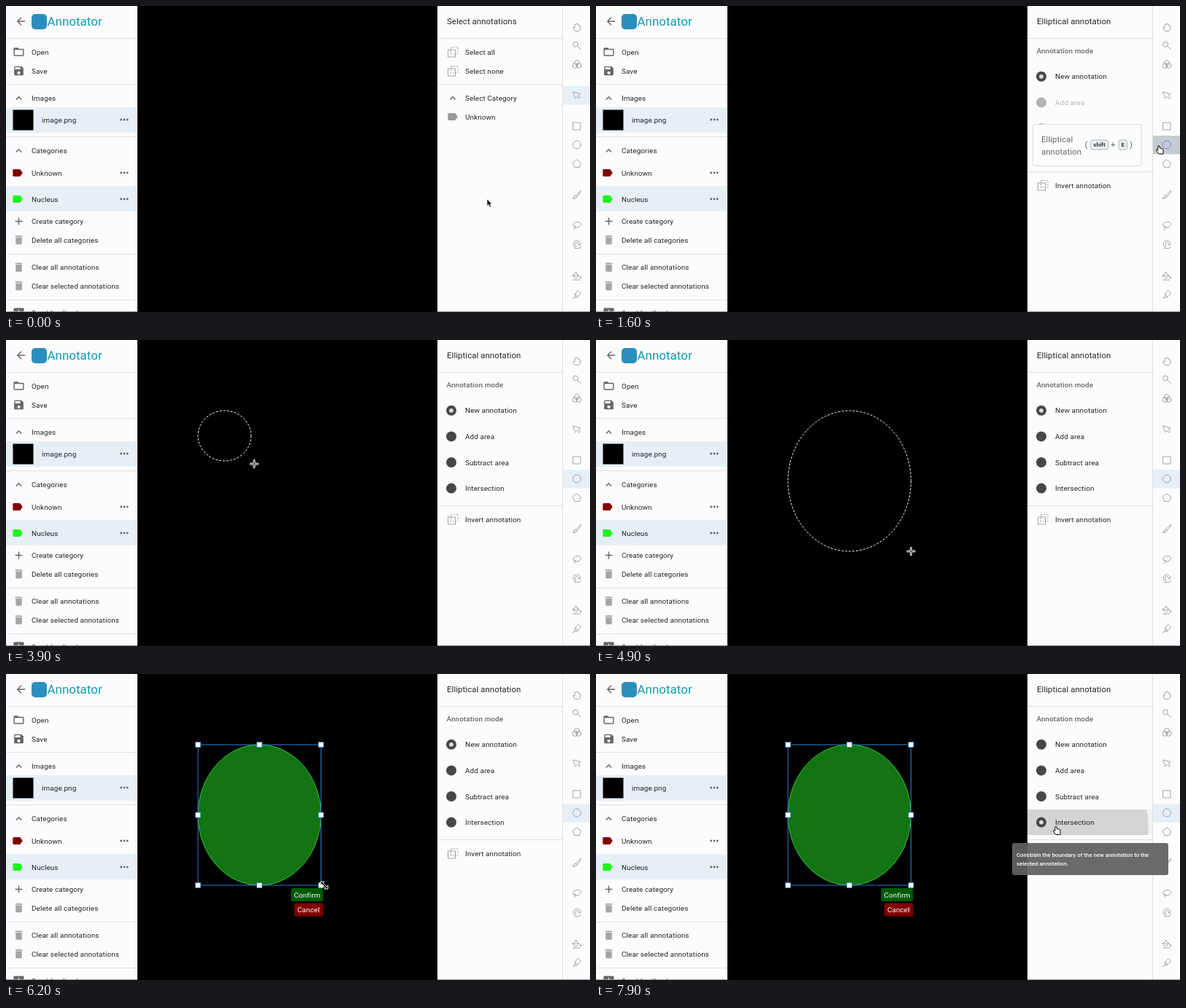
Write an HTML page that moves like this. It is 800 px wide and 420 px high and loops after 8000 ms.

```html
<!DOCTYPE html>
<html lang="en">
<head>
<meta charset="utf-8">
<title>Elliptical annotation</title>
<style>
html, body { margin: 0; width: 100%; height: 100%; overflow: hidden; background: #000; }
svg { display: block; width: 800px; height: 420px; font: 9.9px Roboto, Arial, sans-serif; letter-spacing: .0107em; }
.line { fill: #e0e0e0; }
.tool { fill: none; stroke: #999; stroke-width: .9; stroke-linejoin: round; stroke-linecap: round; }
.big { font-size: 11.3px; letter-spacing: .0094em; }
.tip { font-size: 7.8px; font-weight: 500; letter-spacing: 0; fill: #fff; }
.key { font-size: 8px; font-weight: 700; letter-spacing: 0; fill: #333; text-anchor: middle; }
</style>
</head>
<body>
<svg id="stage" viewBox="0 0 800 420"></svg>
<script>
const ICON = {
  back: 'M20 11H7.83l5.59-5.59L12 4l-8 8 8 8 1.41-1.41L7.83 13H20z',
  folder: 'M20 6h-8l-2-2H4c-1.1 0-2 .9-2 2v12c0 1.1.9 2 2 2h16c1.1 0 2-.9 2-2V8c0-1.1-.9-2-2-2zm0 12H4V8h16z',
  save: 'M17 3H5c-1.1 0-2 .9-2 2v14c0 1.1.9 2 2 2h14c1.1 0 2-.9 2-2V7zm-5 16a3 3 0 1 1 0-6 3 3 0 0 1 0 6zm3-10H5V5h10z',
  up: 'M12 8l-6 6 1.41 1.41L12 10.83l4.59 4.58L18 14z',
  more: 'M6 10a2 2 0 1 0 0 4 2 2 0 0 0 0-4zm6 0a2 2 0 1 0 0 4 2 2 0 0 0 0-4zm6 0a2 2 0 1 0 0 4 2 2 0 0 0 0-4z',
  label: 'M17.6 5.8C17.3 5.3 16.7 5 16 5H5C3.9 5 3 5.9 3 7v10c0 1.1.9 2 2 2h11c.7 0 1.3-.3 1.6-.8L22 12z',
  add: 'M19 13h-6v6h-2v-6H5v-2h6V5h2v6h6z',
  bin: 'M6 19c0 1.1.9 2 2 2h8c1.1 0 2-.9 2-2V7H6zM19 4h-3.5l-1-1h-5l-1 1H5v2h14z',
  feedback: 'M20 2H4c-1.1 0-2 .9-2 2v18l4-4h14c1.1 0 2-.9 2-2V4c0-1.1-.9-2-2-2zm-7 12h-2v-2h2zm0-4h-2V6h2z'
};
const INK = '#222', GREY = '#666', PALE = '#b3b3b3', BIN = '#a5a5a5', TINT = '#e7eff6', PAPER = '#fcfcfc';
const PANEL = 591;

const rect = (x, y, w, h, fill, more = '') =>
  `<rect x="${x}" y="${y}" width="${w}" height="${h}" fill="${fill}" ${more}/>`;
const text = (x, y, s, more = '') => `<text x="${x}" y="${y + 3.5}" ${more}>${s}</text>`;
const icon = (name, x, y, fill = GREY) =>
  `<path d="${ICON[name]}" fill="${fill}" transform="translate(${x} ${y}) scale(.7075) translate(-12 -12)"/>`;
const line = (x, y, w) => `<rect class="line" x="${x}" y="${y}" width="${w}" height="1"/>`;
const group = (id, body) => `<g id="${id}">${body}</g>`;
const item = (name, y, s, fill) => icon(name, 17.5, y, fill) + text(35, y, s);
const dots = y => icon('more', 162, y);
const squares = y => `<g fill="none" stroke="#a5a5a5">
  <rect x="609.5" y="${y - 6.5}" width="9.5" height="9.5" stroke-dasharray="2 1.5"/>
  <rect x="605.5" y="${y - 3}" width="10" height="10"/></g>`;

const leftPanel = rect(0, 0, 180, 420, PAPER) +
  rect(0, 139, 180, 35, TINT) + rect(0, 247, 180, 35, TINT) +
  [44, 107, 179, 340, 403].map(y => line(0, y, 180)).join('') +
  icon('back', 20.5, 21) + rect(35, 11, 21, 21, '#2b8fbd', 'rx="5"') +
  '<text x="56.5" y="27.3" font-size="17" letter-spacing="0" fill="#129ab4">Annotator</text>' +
  item('folder', 63, 'Open') + item('save', 89, 'Save') +
  item('up', 126.5, 'Images') + rect(9.5, 142.5, 28, 28, '#000') + text(49, 156, 'image.png') + dots(156) +
  item('up', 198.5, 'Categories') +
  icon('label', 15.7, 229, '#800000') + text(35, 229, 'Unknown') + dots(229) +
  icon('label', 15.7, 265, '#1df51d') + text(35, 265, 'Nucleus') + dots(265) +
  item('add', 295.5, 'Create category') + item('bin', 321, 'Delete all categories', BIN) +
  item('bin', 358.5, 'Clear all annotations', BIN) + item('bin', 384, 'Clear selected annotations', BIN) +
  item('feedback', 421.5, 'Send feedback');

const selectPanel = text(604, 21.5, 'Select annotations', 'class="big"') + line(PANEL, 107, 171) +
  squares(63) + text(629, 63, 'Select all') + squares(89) + text(629, 89, 'Select none') +
  icon('up', 612, 126.5) + text(629, 126.5, 'Select Category') +
  icon('label', 611.7, 152, '#999') + text(629, 152, 'Unknown');

const modes = ['New annotation', 'Add area', 'Subtract area', 'Intersection'];
const modeY = i => 96.8 + i * 35.6;
const ellipsePanel = text(604, 21.5, 'Elliptical annotation', 'class="big"') +
  text(603.5, 61.5, 'Annotation mode', `font-weight="500" fill="${GREY}"`) +
  group('hover', rect(PANEL, 186, 171, 35, '#f2f2f2') +
    '<circle id="rowRipple" cx="630" cy="209" clip-path="url(#row)" opacity=".14"/>') +
  modes.map((name, i) => group('mode' + i,
    `<circle cx="610" cy="${modeY(i)}" r="7" fill="#474747"/>` + text(629, modeY(i), name))).join('') +
  '<circle id="dot" cx="610" r="2.9" fill="#ddd"/>' +
  line(PANEL, 227, 171) + squares(246) + text(629, 246, 'Invert annotation');

// Each tool: centre height and a path around its centre
const tools = [
  [29, 'M-3 5L-5.5 1Q-5-.5-3 1V-3.5Q-2-5-1.2-3.5V-4.5Q0-6 .8-4.5V-3.5Q2-5 2.8-3V-2Q4-3 4.8-1V2Q4 5 2.5 5.5H-2Z'],
  [54, 'M1.6-1.5A3.5 3.5 0 1 0-5.4-1.5 3.5 3.5 0 1 0 1.6-1.5M.8 1L5.5 5.5'],
  [80, 'M3.5-2A3.5 3.5 0 1 0-3.5-2 3.5 3.5 0 1 0 3.5-2M1 1.8A3.5 3.5 0 1 0-6 1.8 3.5 3.5 0 1 0 1 1.8M6 1.8A3.5 3.5 0 1 0-1 1.8 3.5 3.5 0 1 0 6 1.8'],
  [122, 'M-5-4L5-1.5 2 .8 4.5 3.5 3 5 .3 2.3-2 4.5Z'],
  [165, 'M-5-5H5V5H-5Z'],
  [190.5, 'M5.5 0A5.5 5.5 0 1 0-5.5 0 5.5 5.5 0 1 0 5.5 0'],
  [216.5, 'M0-5.5L5.5-1.3 3.4 5H-3.4L-5.5-1.3Z'],
  [259, 'M5-5.5L-1.5 1 .3 2.8 5.5-4ZM-1.5 1Q-4 1-4 4L-6 5Q-1 6 .3 2.8'],
  [301, 'M-3.5 2.5C-8-1-3-5 2-4.5 8-4 6 3-1 3-4 3-4 0-2.5 1.2-1 3-2 5-4 5.5'],
  [327, 'M-3 4A5 5 0 1 1 5 .5L2.5 1A2.5 2.5 0 1 0-1.5 2ZM-3 5.500H3.500L5.500 3'.replaceAll('00', '')],
  [370, 'M-2-5L3 0-1.5 4-6 0-1-4M-6 0H3M5 1.5Q6.8 4 5 4 3.200 4 5 1.5M-5.5 6H4'.replaceAll('00', '')],
  [396, 'M2-5.5L5.5-2 1 3.5-3 4-2-1ZM-3 4L-5.5 5.5M-2-1L1 3']
];
const toolbar = rect(762, 0, 38, 420, PAPER) + '<rect class="line" x="762" width="1" height="420"/>' +
  group('picked', rect(763, 0, 37, 25.5, TINT)) + rect(763, 178, 37, 25.5, '#000', 'id="toolRipple"') +
  tools.map(([y, d], i) => `<path id="tool${i}" class="tool" d="${d}" transform="translate(782 ${y})"/>`).join('');

const key = (x, w, s) => rect(x, 184, w, 13, '#edf1f5', 'stroke="#aab4be" rx="2.5"') +
  `<text class="key" x="${x + w / 2}" y="193.3">${s}</text>`;
const toolTip = rect(598.5, 162.5, 148.5, 57, PAPER, 'stroke="#d8d8d8" rx="3"') +
  `<g class="big" fill="${GREY}">` + text(610, 183, 'Elliptical') + text(610, 200, 'annotation') +
  text(669.5, 190.5, '(') + text(705, 190.5, '+') + text(731, 190.5, ')') + '</g>' +
  key(677.5, 24, 'shift') + key(716, 11.5, 'E');
const modeTip = rect(570, 232, 214, 44, '#616161', 'rx="3" fill-opacity=".94"') +
  text(576, 247, 'Constrain the boundary of the new annotation to the', 'class="tip"') +
  text(576, 259, 'selected annotation.', 'class="tip"');

const box = { left: 263, top: 97, right: 431.5, bottom: 290 };
const boxW = box.right - box.left, boxH = box.bottom - box.top;
const midX = box.left + boxW / 2, midY = box.top + boxH / 2;
const handles = [box.left, midX, box.right].flatMap(x => [box.top, midY, box.bottom].map(y => [x, y]))
  .filter(([x, y]) => x !== midX || y !== midY);
const button = (x, y, s, fill) => rect(x, y, 434.5 - x, 18, fill, 'rx="2"') +
  text(x + 4, y + 9, s, 'fill="#fff"');
const selection =
  `<ellipse cx="${midX}" cy="${midY}" rx="${boxW / 2}" ry="${boxH / 2}" fill="#127412" stroke="#3cc63c"/>` +
  rect(box.left, box.top, boxW, boxH, 'none', 'stroke="#2a7fd4"') +
  handles.map(([x, y]) => rect(x - 3.5, y - 3.5, 7, 7, '#fff', 'stroke="#2a7fd4" stroke-width=".7"')).join('') +
  button(390.5, 294, 'Confirm', '#005a00') + button(395, 314.5, 'Cancel', '#800000');

const cursors =
  '<path id="arrow" d="M0 0V9.5L2.2 7.5 3.8 11 5.5 10.2 4 6.9H6.8Z" fill="#000" stroke="#fff" stroke-width=".7"/>' +
  '<path id="hand" d="M-1.2 1V6L-2.7 5-3.8 6 0 11H6V4.5L4.5 3.6 1.2 3V1A1.2 1.2 0 0 0-1.2 1Z" fill="#fff" stroke="#000"/>' +
  '<path id="cross" d="M-1-5.5H1V-1H5.5V1H1V5.5H-1V1H-5.5V-1H-1Z" fill="#555" stroke="#ddd"/>' +
  '<path id="resize" d="M-5-5H0L-1.7-3.3 3.3 1.7 5 0V5H0L1.7 3.3-3.3-1.7-5 0Z" fill="#000" stroke="#fff"/>';

document.getElementById('stage').innerHTML =
  `<clipPath id="row"><rect x="${PANEL}" y="186" width="171" height="35"/></clipPath>` +
  rect(180, 0, 412, 420, '#000') +
  '<ellipse id="draft" fill="none" stroke="#fff" stroke-dasharray="3 2"/>' + group('selection', selection) +
  `<g fill="${INK}">` + leftPanel + rect(PANEL, 0, 171, 420, PAPER) + line(PANEL, 44, 171) +
  group('selectPanel', selectPanel) + group('ellipsePanel', ellipsePanel) + toolbar +
  group('toolTip', toolTip) + group('modeTip', modeTip) + '</g>' +
  rect(0, 419, 180, 1, '#999') + rect(PANEL, 419, 209, 1, '#999') + group('cursor', cursors);

const $ = id => document.getElementById(id);
const show = (id, on) => $(id).style.display = on ? '' : 'none';
const set = (id, attrs) => { for (const k in attrs) $(id).setAttribute(k, attrs[k]); };
const ramp = (t, a, b) => Math.min(1, Math.max(0, (t - a) / (b - a)));
const smooth = p => p * p * (3 - 2 * p);

// Pointer path: time, x, y
const path = [
  [0, 659, 265], [300, 659, 265], [700, 715, 242], [1100, 767, 197], [1200, 771, 192], [1700, 771, 192],
  [2000, 655, 200], [2200, 330, 130], [2600, 330, 130], [3300, 263, 97], [3500, 263, 97],
  [3900, 340, 170], [4400, 395, 235], [4800, 431.5, 290], [5300, 431.5, 290], [5700, 436, 290],
  [6300, 436, 290], [6700, 595, 265], [6900, 626, 217], [7100, 626.5, 215], [7500, 630, 209.5], [8000, 630, 209.5]
];
function pointer(t) {
  const i = path.findIndex(p => p[0] > t);
  const [a, b] = [path[i - 1], path[i]], p = ramp(t, a[0], b[0]);
  return [a[1] + (b[1] - a[1]) * p, a[2] + (b[2] - a[2]) * p];
}

function draw(t) {
  const elliptical = t >= 1500, drawing = t >= 3500 && t < 5400, selected = t >= 5400;
  const onTool = t >= 1200 && t < 1800, onMode = t >= 6900;

  show('selectPanel', !elliptical);
  show('ellipsePanel', elliptical);
  set('picked', { transform: `translate(0 ${elliptical ? 178 : 110})` });
  set('toolRipple', { opacity: onTool ? .05 + .1 * ramp(t, 1400, 1600) : t < 1800 ? 0 : .1 * (1 - ramp(t, 1700, 2000)) });
  $('tool5').style.stroke = onTool ? '#8a72dc' : '';
  set('toolTip', { opacity: ramp(t, 1200, 1400) * (1 - ramp(t, 1800, 2000)) });

  modes.forEach((_, i) => {
    const off = i > 0 && t < 3500;
    set('mode' + i, { fill: off ? PALE : INK });
    $('mode' + i).firstChild.setAttribute('fill', off ? PALE : '#474747');
  });
  set('dot', { cy: modeY(t >= 7700 ? 3 : 0) });
  show('hover', onMode);
  set('rowRipple', { r: 135 * smooth(ramp(t, 7450, 8000)) ** .7 });
  const grow = ramp(t, 6968, 7168);
  set('modeTip', {
    opacity: grow ** 2,
    transform: `translate(677 232) scale(${.75 + .25 * grow} ${.5625 + .4375 * grow}) translate(-677 -232)`
  });

  // The outline trails the pointer slightly
  show('draft', drawing);
  if (drawing) {
    const [ex, ey] = pointer(t - 22);
    const rx = (ex - box.left) / 2, ry = (ey - box.top) / 2;
    set('draft', { cx: box.left + rx, cy: box.top + ry, rx, ry });
  }
  show('selection', selected);

  const [x, y] = pointer(t);
  const shape = x >= PANEL ? (onTool || onMode ? 'hand' : 'arrow') : selected && t <= 6300 ? 'resize' : 'cross';
  for (const id of ['arrow', 'hand', 'cross', 'resize']) show(id, id === shape);
  set('cursor', { transform: `translate(${x} ${y})` });
}

function tick() {
  draw(Math.floor(performance.now() % 8000 / 100) * 100);
  requestAnimationFrame(tick);
}
tick();
</script>
</body>
</html>
```
